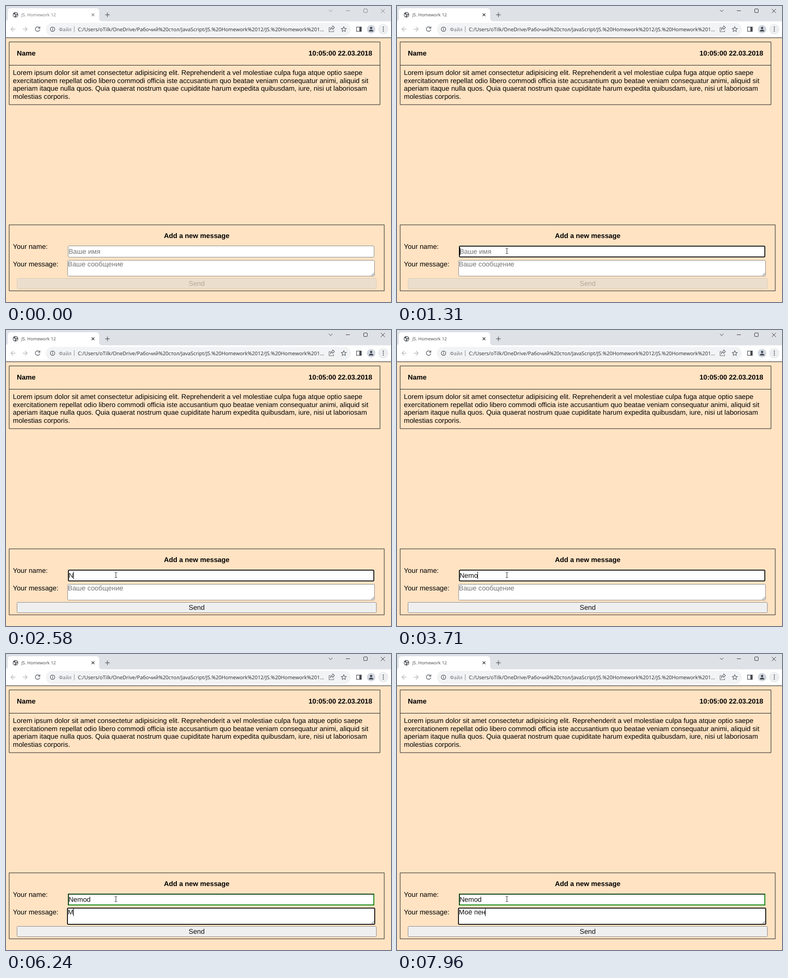
These frames come from a looping animation (852 by 657 pixels, 8 s). An HTML page:

```html
<!DOCTYPE html>
<html lang="ru">
<head>
<meta charset="utf-8">
<title>JS. Homework 12</title>
<style>
  html, body { margin: 0; width: 852px; height: 657px; overflow: hidden; }
  svg { display: block; }
  text { white-space: pre; text-rendering: geometricPrecision; }
  .page { font: 15.18px "Liberation Sans", Arial, sans-serif; }
  .bold { font-weight: bold; }
  .ui { font: 11.28px "Open Sans", "Noto Sans", sans-serif; }
  .small { font-size: 9.7px; }
  .line { fill: none; stroke: #111; }
  .icon { fill: none; stroke: #5f6368; stroke-width: 1.4; }
  .frame { --ink: #858789; }
  .frame.active { --ink: #303236; }
  .frame path, .frame rect { fill: none; stroke: var(--ink); }
  .frame text { fill: var(--ink); }
  .frame .title { fill: #75777a; }
  .frame.active .title { fill: #45474a; }
</style>
</head>
<body>
<svg width="852" height="657" viewBox="0 0 852 657">
  <rect width="852" height="657" fill="#ffe3c3"/>

  <!-- Browser window -->
  <rect width="852" height="34" fill="#dee1e6"/>
  <path d="M-3 34q7 0 7-7V12q0-7 7-7H199q7 0 7 7V27q0 7 7 7z" fill="#fff"/>
  <rect y="34" width="852" height="36" fill="#fff"/>
  <path class="line" d="M0 70.5H852"/>
  <circle cx="21" cy="19.5" r="6" fill="#505357"/>
  <path d="M16 18l4 1 1 2-2 3-3-3zM21 14.5l4 2-1 2-3 0-1-2zM23 20l3 0-2 4-2-1z" fill="#e8eaed"/>
  <g id="frame" class="frame">
    <text class="ui small title" x="34" y="23">JS. Homework 12</text>
    <path d="M189.5 16.5l6 6m0-6l-6 6" stroke-width="1.3"/>
    <path d="M714.5 8.5l4 4 4-4M752 10.5h9M829.5 6.5l9 9m0-9l-9 9"/>
    <rect x="791.5" y="6.5" width="8" height="8" rx="1.5"/>
  </g>
  <path class="icon" d="M219.5 19.5h10m-5-5v10"/>
  <path class="icon" style="stroke:#babcbe" d="M21 51.5H11m5-5l-5 5 5 5M37 51.5h10m-5-5l5 5-5 5"/>
  <path class="icon" d="M73.8 48a5 5 0 1 0 1 4.5M75 45.5v4h-4" stroke="#444"/>
  <rect x="88" y="37.5" width="675" height="28.5" rx="14.2" fill="#f1f3f4"/>
  <circle class="icon" cx="103" cy="51.5" r="4.8"/>
  <path class="icon" d="M103 50.5v3.5M103 48.3v1.3"/>
  <text class="ui" style="font-size:11px" x="117" y="55.5" fill="#6b6f73">Файл</text>
  <path d="M151 45v13" stroke="#85888c"/>
  <text class="ui" x="159" y="55.5" fill="#27292c">C:/Users/oTilk/OneDrive/Рабочий%20стол/JavaScript/JS.%20Homework%2012/JS.%20Homework%201...</text>
  <path class="icon" style="stroke-width:1.1" d="M718 48h-3v9h10v-3M718 54q0-4.5 5-4.5v2.5l4-4-4-4v2.5q-5 .5-5 7.5z"/>
  <path class="icon" style="stroke-width:1.2" d="M747.5 46l1.6 3.6 4 .4-3 2.7.9 3.9-3.5-2-3.5 2 .9-3.9-3-2.7 4-.4z"/>
  <rect class="icon" x="775.7" y="46.7" width="10.6" height="9.6"/>
  <rect x="782" y="46" width="5" height="11" fill="#4a4d51"/>
  <circle cx="808" cy="51.5" r="9.5" fill="#d3d8e0"/>
  <circle cx="808" cy="48.8" r="2.5" fill="#40464f"/>
  <path d="M803 56.5q0-4 5-4t5 4z" fill="#40464f"/>
  <circle cx="835" cy="51.5" r="11.5" fill="#eceef0"/>
  <path d="M835 47v0m0 4.3v0m0 4.3v0" stroke="#4a4d51" stroke-width="2.4" stroke-linecap="round"/>

  <!-- Message card -->
  <g class="page">
    <path class="line" d="M7 79.8H827.7V219H7zM7 131.5H827.7"/>
    <text class="bold" x="24" y="110.2">Name</text>
    <text class="bold" x="810.5" y="110.2" text-anchor="end">10:05:00 22.03.2018</text>
    <text x="15.3" y="153.3">Lorem ipsum dolor sit amet consectetur adipisicing elit. Reprehenderit a vel molestiae culpa fuga atque optio saepe</text>
    <text x="15.3" y="170.8">exercitationem repellat odio libero commodi officia iste accusantium quo beatae veniam consequatur animi, aliquid sit</text>
    <text x="15.3" y="188.3">aperiam itaque nulla quos. Quia quaerat nostrum quae cupiditate harum expedita quibusdam, iure, nisi ut laboriosam</text>
    <text x="15.3" y="205.8">molestias corporis.</text>

    <!-- Form -->
    <rect class="line" x="7" y="485.8" width="830" height="146.4"/>
    <text class="bold" x="422" y="514.8" text-anchor="middle">Add a new message</text>
    <text x="15.3" y="539.3">Your name:</text>
    <text x="15.3" y="577.5">Your message:</text>
    <rect id="nameBox" fill="#fff"/>
    <path id="insetShade" d="M138 557V533H814" fill="none" stroke="#023602" stroke-width="2"/>
    <text id="nameText" x="138.4" y="550"></text>
    <rect id="messageBox" fill="#fff"/>
    <text id="messageText" x="136.8" y="578"></text>
    <path d="M808.5 598.5l6-6m-3 6l3-3" stroke="#555"/>
    <rect id="button" x="24.5" y="604.5" width="795" height="23" rx="2"/>
    <text id="buttonText" x="422" y="621.3" text-anchor="middle">Send</text>
  </g>
  <rect id="caret" width="1" height="17" fill="#000"/>

  <g id="tooltip">
    <rect x="250.5" y="555.5" width="107" height="20" fill="#fff" stroke="#8a8a8a"/>
    <text class="ui small" style="font-size:9.5px" x="256" y="569" fill="#575757">Заполните это поле.</text>
  </g>
  <path id="beam" fill="none" stroke="#222" d="M-2.5-5.5h2l.5.5.5-.5h2M0-5V5M-2.5 5.5h2l.5-.5.5.5h2"/>
  <path id="arrow" fill="#fff" stroke="#111" stroke-width=".8" d="M0 0v14l3.3-3 2.2 4.6 2-1-2.2-4.4h4.5z"/>
</svg>
<script>
  const LOOP = 8000, BLINK = 530, RING = 2;
  const CLICK = 1310, TAB = 4320, MOVE_START = 100, MOVE_END = 510, TOOLTIP = 1040;
  const el = id => document.getElementById(id);
  const set = (node, attrs) => {
    for (const key in attrs) node.setAttribute(key, attrs[key]);
  };
  const show = (node, visible) => set(node, { visibility: visible ? 'visible' : 'hidden' });

  const fields = [
    { id: 'name', hint: 'Ваше имя', text: 'Nemod', keys: [2580, 2780, 3510, 3710, 3910],
      box: [137, 532, 678, 26], border: 2, caretY: 536, from: CLICK, to: TAB },
    { id: 'message', hint: 'Ваше сообщение', text: 'Моё пен', keys: [6240, 6500, 7360, 7490, 7690, 7890, 7960],
      box: [136, 564, 680, 36], border: 1, caretY: 565, from: TAB, to: LOOP }
  ];

  function mouseAt(t) {
    const steps = Math.floor((t - MOVE_START) / (MOVE_END - MOVE_START) * 6 + 1e-6);
    const p = Math.min(1, Math.max(0, steps / 6)), rest = 1 - p;
    return { x: 243.2 + 60 * rest ** 2, y: 544 + 57 * rest ** 3 - 75 * p * p * rest };
  }

  // A positive outset lets the stroke reach beyond the field's box.
  function drawBox(field, color, weight, radius, outset = 0) {
    const [x, y, w, h] = field.box, inset = weight / 2 - outset;
    set(el(field.id + 'Box'), {
      x: x + inset, y: y + inset, width: w - 2 * inset, height: h - 2 * inset,
      rx: radius, stroke: color, 'stroke-width': weight
    });
  }

  function drawField(field, t, mouse) {
    const count = field.keys.filter(k => k <= t).length;
    const label = el(field.id + 'Text');
    const content = count ? field.text.slice(0, count) : field.hint;
    if (label.textContent !== content) label.textContent = content;
    set(label, { fill: count ? '#111' : '#757575' });

    const focused = t >= field.from && t < field.to;
    const [, top, , height] = field.box;
    const hovered = t >= MOVE_START && mouse.y >= top && mouse.y < top + height;
    if (focused) drawBox(field, '#101010', RING, 2, RING - field.border);
    else if (t >= field.to) drawBox(field, '#0a840a', field.border, 0);
    else drawBox(field, hovered ? '#4f4f4f' : '#858585', 1, 2);

    if (focused) {
      const last = count ? field.keys[count - 1] : CLICK - 10;
      const on = Math.floor((t - last) / BLINK) % 2 === 0;
      const x = count ? Math.floor(+label.getAttribute('x') + label.getComputedTextLength()) : 139;
      set(el('caret'), { x, y: field.caretY });
      show(el('caret'), on && (count || field.id === 'name'));
    }
    return hovered;
  }

  function draw(t) {
    const mouse = mouseAt(t), moving = t >= MOVE_START;
    show(el('caret'), false);
    const overField = fields.map(f => drawField(f, t, mouse)).some(Boolean);
    for (const id of ['beam', 'arrow']) {
      set(el(id), { transform: `translate(${mouse.x} ${mouse.y})` });
      show(el(id), moving && overField === (id === 'beam'));
    }
    show(el('insetShade'), t >= TAB);
    show(el('tooltip'), t >= TOOLTIP && t < CLICK);
    el('frame').classList.toggle('active', t >= CLICK);

    const enabled = t >= fields[0].keys[0];
    set(el('button'), { fill: enabled ? '#efefef' : '#ecdecc', stroke: enabled ? '#858585' : '#d6cab9' });
    set(el('buttonText'), { fill: enabled ? '#111' : '#b3a89b' });
  }

  const start = performance.now();
  function tick() {
    draw((performance.now() - start) % LOOP);
    requestAnimationFrame(tick);
  }
  tick();
</script>
</body>
</html>
```
